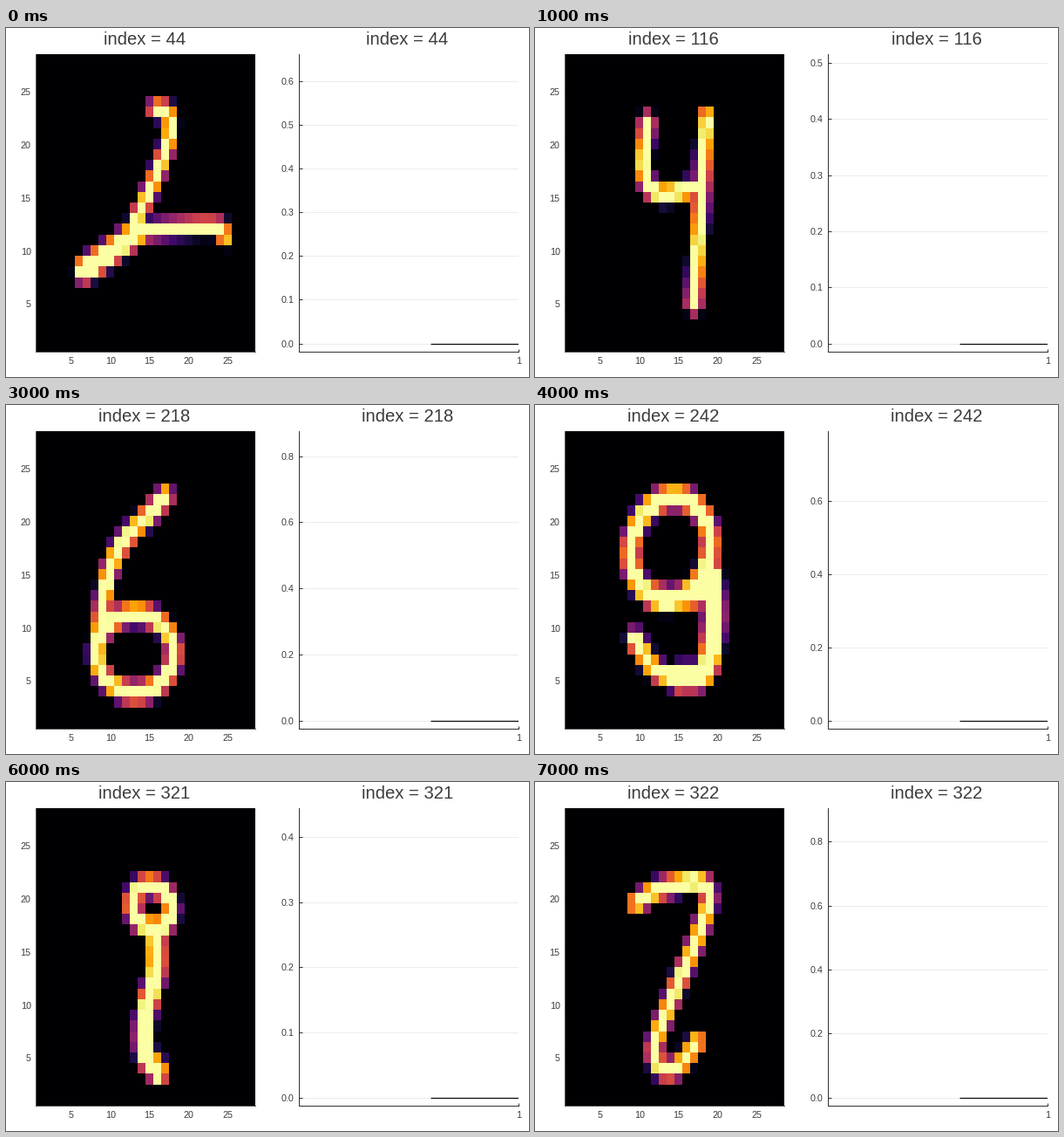
These frames come from a looping animation (600 px wide and 400 px high, 8000 ms). A matplotlib script:

```python
import numpy as np
import matplotlib.pyplot as plt
from matplotlib.animation import FuncAnimation

W, H, DPI = 600, 400, 100
PX = 72 / DPI  # points per pixel
INK = "#3c3c3c"
plt.rcParams["font.family"] = "Liberation Sans"


def curve(*points):
    """Smooth path through the key points (Catmull-Rom)."""
    p = np.array(points, float)
    p = np.vstack([2 * p[0] - p[1], p, 2 * p[-1] - p[-2]])
    t = np.linspace(0, 1, 40)[:, None]
    return np.vstack([
        b + t / 2 * (c - a + t * (2 * a - 5 * b + 4 * c - d
                                  + t * (3 * (b - c) + d - a)))
        for a, b, c, d in zip(p, p[1:], p[2:], p[3:])])


def oval(cx, cy, rx, ry, lean=0):
    """Ellipse sheared sideways by lean."""
    t = np.linspace(0, 2 * np.pi, 160)
    y = ry * np.sin(t)
    return np.column_stack([cx + rx * np.cos(t) + lean * y, cy + y])


def rasterize(strokes):
    """Soft-edged coverage of (path, half width) strokes on a 28 x 28 grid."""
    y, x = np.mgrid[1:29, 1:29]
    ink = np.zeros((28, 28))
    for path, half in strokes:
        dist = np.hypot(x[..., None] - path[:, 0], y[..., None] - path[:, 1])
        ink = np.maximum(ink, half + .5 - dist.min(axis=-1))
    return np.clip(ink, 0, 1)


two_flat = [
    (curve((15.8, 23.3), (17.3, 22.9), (17.6, 21), (16.4, 18), (13.3, 12.8)), .9),
    (curve((6.7, 8.2), (9, 9.3), (13.3, 11.6)), 1.25),
    (curve((13, 11.7), (18, 12.1), (23.7, 12.2), (24.6, 11.2)), .8),
]
four = [
    (curve((11, 22), (10.6, 17.5), (12.5, 15.4), (18, 16)), .95),
    (curve((18.6, 22.5), (17, 5)), .95),
]
eight_open = [
    (curve((11.9, 22.6), (13.5, 23.3), (17, 23.5)), .6),
    (curve((17.3, 23.3), (19.5, 21.3), (19.1, 18.8), (17.5, 16), (15.8, 15)), 1),
    (curve((10.5, 17.6), (12.5, 17.4), (15, 16)), .75),
    (oval(15, 10.3, 3.9, 4.4, .38), 1.05),
]
six = [
    (curve((17, 22.3), (10.5, 16.5), (8.4, 8.5)), 1),
    (oval(13.2, 7.6, 4.9, 3.7), 1),
]
nine_round = [
    (oval(14, 17.4, 5.05, 4.85, .1), 1.1),
    (curve((10.5, 13.4), (15, 12.7), (19, 13.2)), 1),
    (curve((19.2, 15), (19.5, 10.5), (18.4, 5.9), (15, 5.3)), 1.35),
    (curve((15, 5.3), (12, 6.1), (9.4, 8.9)), 1),
]
eight_bold = [
    (curve((17, 23.1), (14.5, 21.9), (12.4, 19.6), (11.4, 17)), 1.35),
    (curve((17, 23.1), (18.5, 21.3), (18.5, 17.5)), 1.4),
    (curve((11.5, 17.2), (13.5, 15.6), (16.5, 16.3), (20.7, 15.6)), 1.5),
    (curve((20.6, 15.5), (20.8, 12.5), (19.8, 10), (16.5, 7.1), (13, 6),
           (10.8, 7.3), (11, 11), (13.5, 15)), 1.4),
]
nine_thin = [
    (oval(15.3, 19.2, 2.45, 2, -.15), 1),
    (curve((15.8, 17), (15.8, 13), (14.5, 9), (14.5, 5.5), (16.1, 3.7)), 1.2),
]
two_tall = [
    (curve((9.6, 19.5), (12.5, 20.8), (17.3, 21.5), (18.9, 20), (17, 15.5),
           (14, 10.3), (12, 6.2), (12.7, 4.1), (15, 4.2), (17.4, 6.5)), .97),
]

# index, strokes, peak of the value axis, bar height
SCENES = [
    (44, two_flat, .642, 0),
    (116, four, .5, 0),
    (185, eight_open, .397, .0012),
    (218, six, .85, 0),
    (242, nine_round, .766, 0),
    (267, eight_bold, .528, .528),
    (321, nine_thin, .431, 0),
    (322, two_tall, .878, 0),
]

fig = plt.figure(figsize=(W / DPI, H / DPI), dpi=DPI, facecolor="white")


def panel(left, right, spine):
    top, bottom = 30.2, 371.2
    ax = fig.add_axes([left / W, 1 - bottom / H,
                       (right - left) / W, (bottom - top) / H])
    ax.spines[["top", "right"]].set_visible(False)
    for side in ("left", "bottom"):
        ax.spines[side].set(color=spine, linewidth=PX)
    ax.tick_params(labelsize=10.7 * PX, labelcolor=INK, color=spine,
                   direction="in", width=PX)
    return ax


def title(x):
    return fig.text(x / W, 1 - 19 / H, "", size=20.25 * PX, color=INK,
                    ha="center", va="baseline")


heat = panel(34.4, 285.9, "#555555")
image = heat.imshow(np.zeros((28, 28)), cmap="inferno", vmin=0, vmax=1,
                    origin="lower", extent=(.5, 28.5, .5, 28.5),
                    aspect="auto", interpolation="nearest")
heat.set_xticks(range(5, 26, 5))
heat.set_yticks(range(5, 26, 5))
heat.tick_params(length=0, pad=5.7 * PX)

chart = panel(336.4, 588, "#333333")
chart.set_axisbelow(True)
chart.grid(color="#ececec", linewidth=PX)
chart.tick_params(length=3.5 * PX, pad=6.2 * PX)
bar = chart.bar(1, 0, width=.8, color="#009afa", edgecolor="#101010",
                linewidth=1.3 * PX)[0]
chart.set_xlim(0, 1)
chart.set_xticks([1])

titles = [title(158.7), title(460.5)]
grids = [rasterize(strokes) for _, strokes, _, _ in SCENES]


def draw(i):
    index, _, peak, value = SCENES[i]
    image.set_data(grids[i])
    for text in titles:
        text.set_text(f"index = {index}")
    step = .1 if peak < .7 else .2
    ticks = np.arange(0, peak * 1.03, step)
    chart.set_yticks(ticks, [f"{v:.1f}" for v in ticks])
    chart.set_ylim(-.03 * peak, 1.03 * peak)
    bar.set_height(value)
    return [image, bar, *titles]


anim = FuncAnimation(fig, draw, frames=len(SCENES), interval=1000,
                     init_func=lambda: draw(0), repeat=True, repeat_delay=0,
                     blit=False)
plt.show()
```
